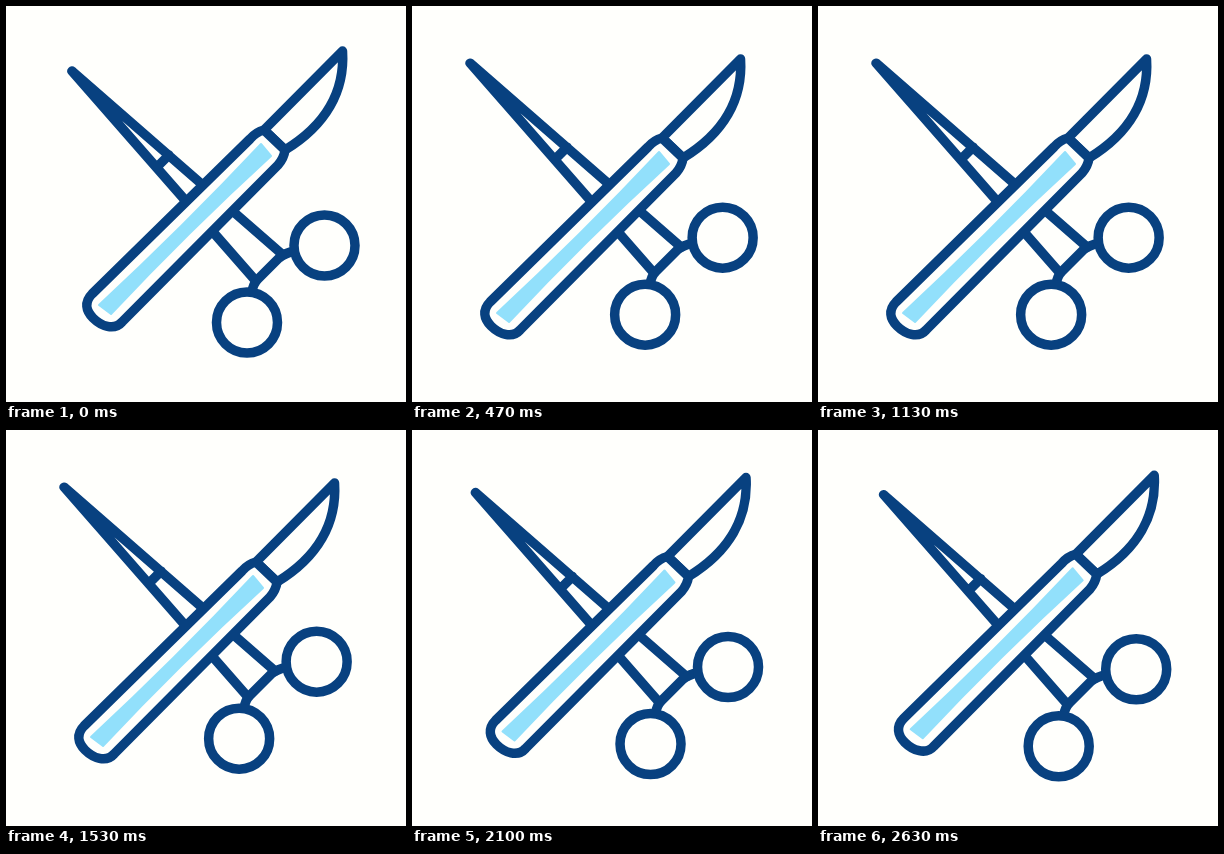
An HTML page for the animation above (2.66 s loop, 400x396 px).

```html
<!DOCTYPE html>
<html lang="en">
<head>
<meta charset="utf-8">
<title>Surgical tools</title>
<style>
  @property --tick {
    syntax: "<number>";
    inherits: true;
    initial-value: 0;
  }

  html, body {
    margin: 0;
    width: 100%;
    height: 100%;
    overflow: hidden;
    background: #fffffc;
  }

  svg {
    display: block;
    width: 100%;
    height: 100%;
    fill: #fffffc;
    stroke: #084180;
    stroke-width: 9.5;
    stroke-linecap: round;
    stroke-linejoin: round;
    /* 80 ticks per loop, 20 per slide; 0 = rest, 1 = furthest */
    --slide: calc((1 - cos(var(--tick) * 18deg)) / 2);
    animation: tick 2660ms steps(80) -5ms infinite;
  }

  @keyframes tick {
    from { --tick: 0; }
    to { --tick: 80; }
  }

  .forceps {
    transform: translate(calc(var(--slide) * -12px), calc(var(--slide) * -12px));
  }

  .scalpel {
    transform: translate(calc(var(--slide) * -12.2px), calc(var(--slide) * 12.2px));
  }

  .open { fill: none; }

  .inlay {
    fill: #92e0fb;
    stroke: #92e0fb;
    stroke-width: 2;
  }
</style>
</head>
<body>
<svg viewBox="0 0 400 396">
  <g class="forceps">
    <path class="open" d="M277 249 66 65 249 274M151 161 163 149"/>
    <path class="open" d="M289 245Q279 247 273 252L252 273Q247 278 246 286"/>
    <circle cx="318.5" cy="239.5" r="30.5"/>
    <circle cx="241" cy="316.5" r="30.5"/>
  </g>
  <g class="scalpel">
    <path d="M258 124 336.5 45C339 85 320 119 279 144Z"/>
    <path d="M86 288 244 133Q250 126 258 124L279 144Q278 152 272 159L116 316C108 325 95 320 87 312C80 305 78 296 86 288Z"/>
    <path class="inlay" d="M255 138 265 150Q182 226 105 308L93 299Q177 221 255 138Z"/>
  </g>
</svg>
</body>
</html>
```
